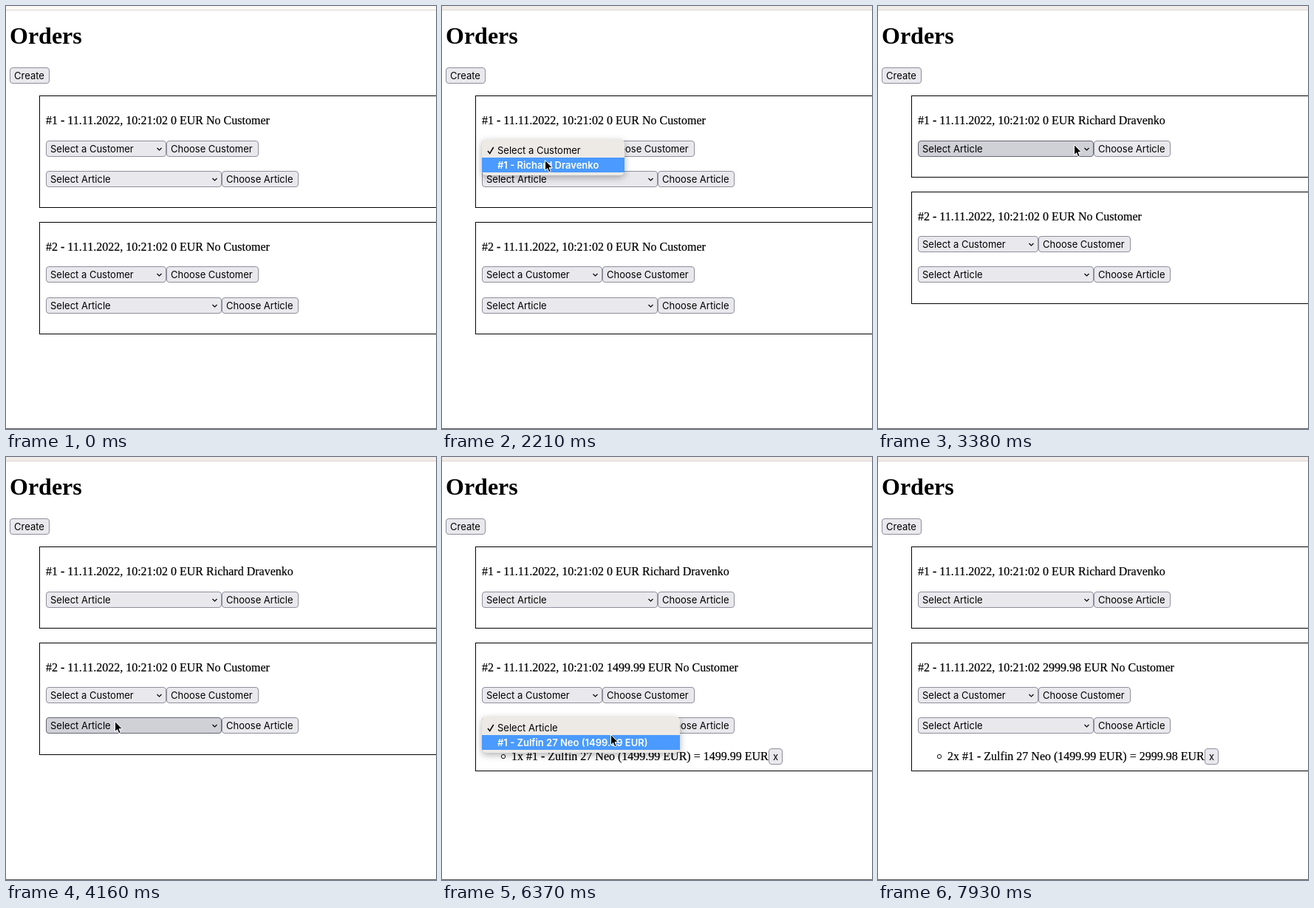
Animation of 582x572 px, one loop 8.06 s. Source, as an HTML page:

```html
<!DOCTYPE html>
<html lang="en">
<head>
<meta charset="utf-8">
<title>Orders</title>
<style>
  html, body { margin: 0; width: 100%; height: 100%; overflow: hidden; background: #fff; }
  svg { display: block; width: 582px; height: 572px; }
  .serif { font: 16px "Liberation Serif", serif; stroke: #000; stroke-width: .2; }
  .title { font: bold 32px "Liberation Serif", serif; }
  .ui { font: 13px Inter, sans-serif; }
  .picked { font-weight: 600; fill: #fff; }
  .line { fill: none; stroke: #000; }
  .menu { fill: #edeae6; filter: drop-shadow(0 3px 5px rgba(0, 0, 0, .3)); }
</style>
</head>
<body>
<svg id="stage" viewBox="0 0 582 572"></svg>
<script>
const TICK = 130, TICKS = 62;
const CUSTOMER = 'Richard Dravenko';
const ARTICLE = 'Zulfin 27 Neo (1499.99 EUR)';
const PRICE = 1499.99;
const ROW_PITCH = 41.4;
const stage = document.getElementById('stage');

// The pointer enters, clicks at each tick given here, then exits.
const enter = { tick: 8, x: 447, y: 548 };
const visits = [
  { name: 'openCustomer', tick: 15, x: 133, y: 192 },
  { name: 'pickCustomer', tick: 18, x: 139, y: 208 },
  { name: 'setCustomer', tick: 24, x: 265, y: 187 },
  { name: 'openArticle', tick: 33, x: 147, y: 357 },
  { name: 'pickArticle', tick: 36, x: 180, y: 378 },
  { name: 'addArticle', tick: 40, x: 325, y: 368 },
  { name: 'openAgain', tick: 47, x: 232, y: 361 },
  { name: 'pickAgain', tick: 50, x: 228, y: 375 },
  { name: 'addAgain', tick: 56, x: 334, y: 366 },
  { name: 'exit', tick: 61, x: 526, y: 528 }
];
const isButton = visit => /^(set|add)/.test(visit.name);

// Arrives one tick before each click and rests two ticks after pressing a button.
function pointerAt(tick) {
  const i = visits.findIndex(visit => tick < visit.tick);
  if (tick < enter.tick || i < 0) return null;
  const from = visits[i - 1] || enter, to = visits[i];
  const start = from.tick + (isButton(from) ? 2 : 0), end = to.tick - 1;
  const k = Math.min(1, Math.max(0, (tick - start) / (end - start)));
  const eased = k * k * (3 - 2 * k);
  return {
    x: from.x + (to.x - from.x) * eased,
    y: from.y + (to.y - from.y) * eased,
    pressed: isButton(to) && tick === end
  };
}

const text = (x, y, content, style) => `<text x="${x}" y="${y}" class="${style}">${content}</text>`;

function scene(tick) {
  const pointer = pointerAt(tick);
  const done = name => tick >= visits.find(visit => visit.name === name).tick;
  const between = (first, last) => done(first) && !done(last);
  const customerMenu = between('openCustomer', 'pickCustomer');
  const articleMenu = between('openArticle', 'pickArticle') || between('openAgain', 'pickAgain');
  const customerPicked = between('pickCustomer', 'setCustomer');
  const articlePicked = between('pickArticle', 'addArticle') || between('pickAgain', 'addAgain');
  const assigned = done('setCustomer');
  const count = done('addArticle') + done('addAgain');
  const total = count ? (count * PRICE).toFixed(2) : '0';
  let overlay = '';

  function control(x, y, w, label) {
    const over = pointer && !customerMenu && !articleMenu &&
      pointer.x >= x && pointer.x < x + w && pointer.y >= y && pointer.y < y + 22;
    const [fill, edge] = !over ? ['#e9e9ed', '#8f8f9d']
      : pointer.pressed ? ['#b1b1b9', '#484851'] : ['#d0d0d7', '#676774'];
    return `<rect x="${x + .5}" y="${y + .5}" width="${w - 1}" height="21" rx="3.5" fill="${fill}" stroke="${edge}"/>` +
      text(x + 6, y + 16, label, 'ui');
  }

  function menu(y, w, options) {
    const hovered = pointer.y >= y + 24 ? 1 : 0;
    const items = options.map((label, i) =>
      text(75, y + 20 + i * 20, label, i === hovered ? 'ui picked' : 'ui'));
    return `<rect class="menu" x="54" y="${y}" width="${w}" height="49" rx="6"/>` +
      `<rect x="54" y="${y + 5 + hovered * 20}" width="${w}" height="20" fill="#4a9aff"/>` +
      `<path fill="none" stroke="${hovered ? '#000' : '#fff'}" stroke-width="1.5" d="M62 ${y + 16}l2.7 3.5 5-8.5"/>` +
      items.join('');
  }

  // A select with its button; its open menu is drawn later, above everything.
  function chooser(rowTop, w, buttonWidth, noun, options, picked, open) {
    const y = Math.floor(rowTop);
    if (open) overlay = menu(Math.round(rowTop - 1.7), w + 30, options);
    return control(54, y, w, options[picked ? 1 : 0]) +
      `<path class="line" stroke-width="1.2" d="M${w + 41.5} ${y + 10}l3 3 3-3"/>` +
      control(54 + w, y, buttonWidth, `Choose ${noun}`);
  }

  function order({ id, top, customer, sum = '0', items = 0, active }) {
    const height = 151 - (customer ? ROW_PITCH : 0) + (items ? 22.4 : 0);
    const edge = Math.round(top);
    let row = top + 60.7;
    let out = `<rect class="line" x="45.5" y="${edge + .5}" width="600" height="${Math.round(top + height) - edge}"/>` +
      text(54, Math.round(top + 39), `#${id} - 11.11.2022, 10:21:02 ${sum} EUR ${customer || 'No Customer'}`, 'serif');
    if (!customer) {
      out += chooser(row, 163, 125, 'Customer', ['Select a Customer', `#1 - ${CUSTOMER}`],
        id === 1 && customerPicked, id === 1 && customerMenu);
      row += ROW_PITCH;
    }
    out += chooser(row, 238, 104, 'Article', ['Select Article', `#1 - ${ARTICLE}`],
      active && articlePicked, active && articleMenu);
    if (items) {
      const y = Math.floor(row + ROW_PITCH);
      out += `<circle class="line" cx="83" cy="${y + 11}" r="2.7" stroke-width=".9"/>` +
        text(94, y + 16, `${items}x #1 - ${ARTICLE} = ${sum} EUR`, 'serif') +
        control(442, y, 19, 'x');
    }
    return { out, next: top + height + 19.6 };
  }

  const first = order({ id: 1, top: 121.4, customer: assigned && CUSTOMER });
  const second = order({ id: 2, top: first.next, sum: total, items: count, active: true });
  const arrow = pointer ? `<path transform="translate(${pointer.x} ${pointer.y})" stroke="#fff"
    d="M.5 .5V14.5L3.6 11.6 5.8 16.7 8.2 15.7 6 10.7H10.4Z"/>` : '';

  return `<rect width="582" height="5" fill="${tick < enter.tick ? '#fdf8f4' : '#f1ece8'}"/>` +
    '<rect y="5" width="582" height="1" fill="#ddd6d2"/>' +
    '<rect y="571" width="582" height="1" fill="#58585c"/>' +
    text(5, 51, 'Orders', 'title') + control(5, 83, 54, 'Create') +
    first.out + second.out + overlay + arrow;
}

let shown = -1;
function play(now) {
  const tick = Math.floor(now / TICK) % TICKS;
  if (tick !== shown) {
    shown = tick;
    stage.innerHTML = scene(tick);
  }
  requestAnimationFrame(play);
}
play(performance.now());
</script>
</body>
</html>
```
